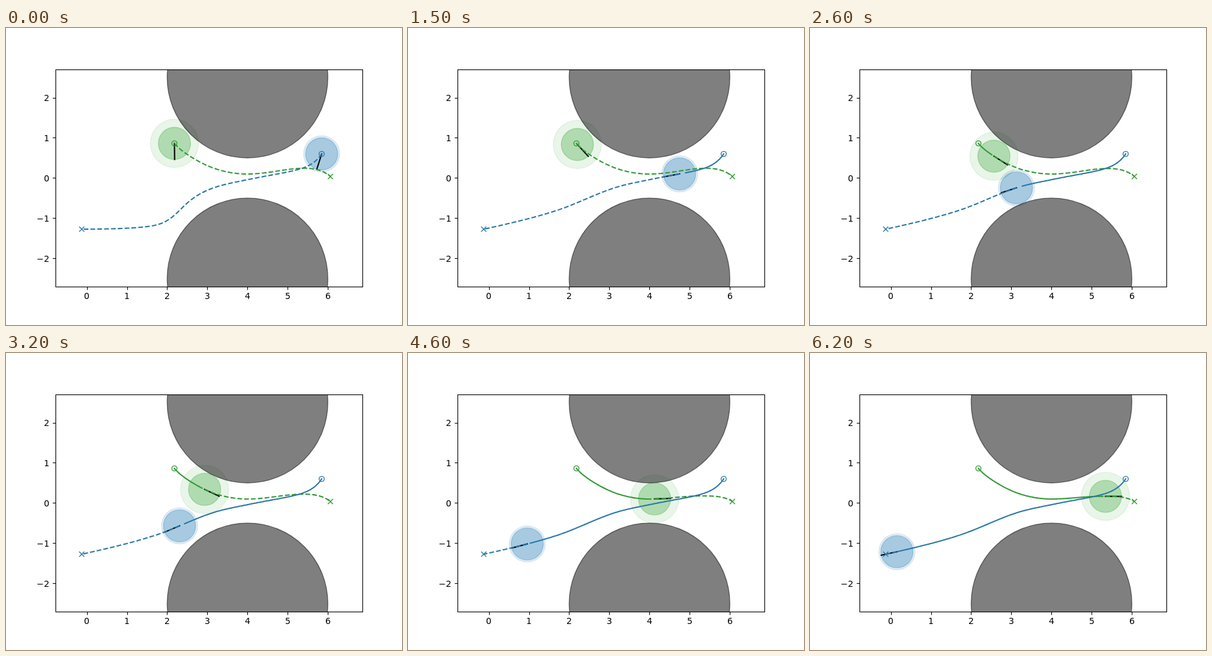
Write an HTML page that moves like this. It is 640 px wide and 480 px high and loops after 6.3 s.

```html
<!DOCTYPE html>
<html lang="en">
<head>
<meta charset="utf-8">
<title>Two robots passing a gap</title>
<style>
  html, body { margin: 0; width: 100%; height: 100%; overflow: hidden; background: #fff; }
  svg { display: block; width: 640px; height: 480px; }
  text { font: 13.89px "DejaVu Sans", sans-serif; fill: #000; }
</style>
</head>
<body>
<svg id="stage" viewBox="0 0 640 480">
  <defs><clipPath id="axes"><rect x="80" y="67" width="496" height="351"/></clipPath></defs>
</svg>
<script>
const STEP = 100, STEPS = 63;
const UNIT = 64.93, X0 = 130.6, Y0 = 242.4;
const TURN = 2.9; // degrees a robot can turn in towards its path per step
const stage = document.getElementById('stage');

function set(node, attrs) {
  for (const key in attrs) node.setAttribute(key, attrs[key]);
}

function add(parent, tag, attrs, text) {
  const node = document.createElementNS('http://www.w3.org/2000/svg', tag);
  set(node, attrs);
  if (text !== undefined) node.textContent = text;
  return parent.appendChild(node);
}

// Smooth curve through [x, y] points, level at peaks.
function curve(points) {
  const last = points.length - 1;
  const gap = i => points[i + 1][0] - points[i][0];
  const rise = i => (points[i + 1][1] - points[i][1]) / gap(i);
  const slope = points.map((p, i) => {
    if (i === 0 || i === last) return 0;
    const a = rise(i - 1), b = rise(i);
    return a * b <= 0 ? 0 : (a * gap(i) + b * gap(i - 1)) / (gap(i) + gap(i - 1));
  });
  slope[0] = (3 * rise(0) - slope[1]) / 2;
  slope[last] = (3 * rise(last - 1) - slope[last - 1]) / 2;
  return x => {
    let i = 0;
    while (i < last - 1 && x > points[i + 1][0]) i++;
    const h = gap(i), u = (x - points[i][0]) / h, v = 1 - u;
    return points[i][1] * v * v * (1 + 2 * u) + points[i + 1][1] * u * u * (3 - 2 * u)
      + h * u * v * (slope[i] * v - slope[i + 1] * u);
  };
}

function smooth(u) {
  u = Math.min(1, Math.max(0, u));
  return u * u * (3 - 2 * u);
}

function trace(f, from, to) {
  const n = Math.max(1, Math.ceil(Math.abs(to - from) / 1.5));
  let d = '';
  for (let i = 0; i <= n; i++) {
    const x = from + (to - from) * i / n;
    d += (i ? 'L' : 'M') + x.toFixed(2) + ' ' + f(x).toFixed(2);
  }
  return d;
}

const greenBase = curve([[272.2, 192], [340, 228], [390, 236], [462, 231.7], [524.3, 231]]);
const greenRun = curve([[9, 272.2], [20, 280], [32, 321], [54, 442.5], [62, 477.5]]);
const blueBase = curve([[122.4, 325.2], [240, 295], [345, 255], [390, 245.2], [510.2, 224.8]]);

// path: the route driven; detour: how far the first plan strays from it;
// settled: how much of the detour is gone; lag: heading error at the start.
const robots = [
  {
    fill: '#2ca02c', line: '#339a38', start: 272.2, goal: 524.3, outer: 0.6, haze: 0.1, lag: 40,
    path: x => greenBase(x) - 5.5 * Math.exp((272.2 - x) / 10) + 9 * Math.exp((x - 524.3) / 14),
    detour: x => x < 390 ? 0 : -5 * Math.sin(Math.PI * ((x - 390) / 134.3) ** 2),
    settled: n => smooth((n - 20) / 34),
    x: n => greenRun(Math.max(9, n))
  },
  {
    fill: '#1f77b4', line: '#2a77a8', start: 510.2, goal: 122.4, outer: 0.45, haze: 0.13, lag: -17,
    path: x => blueBase(x) - 21.3 * Math.exp((x - 510.2) / 16),
    detour: x => 0.215 * (x - 122.4) / (1 + Math.exp((x - 278) / 13)),
    settled: n => 1 - 0.5 ** n,
    x: curve([[0, 510.2], [9, 487.5], [20, 390.3], [32, 280.5], [46, 192.7], [62, 140.5]])
  }
];

const plot = add(stage, 'g', { 'clip-path': 'url(#axes)' });

function disc(color, alpha, radius, place) {
  return add(plot, 'circle', {
    r: radius * UNIT, fill: color, 'fill-opacity': alpha,
    stroke: color, 'stroke-opacity': alpha, 'stroke-width': 1.39, ...place
  });
}

function stroke(color, extra) {
  return add(plot, 'path', { fill: 'none', stroke: color, 'stroke-width': 2.08, 'stroke-linejoin': 'round', ...extra });
}

for (const r of robots) r.discs = [disc(r.fill, r.haze, r.outer), disc(r.fill, 0.3, 0.4)];
for (const y of [2.5, -2.5]) disc('#000', 0.5, 2, { cx: X0 + 4 * UNIT, cy: Y0 - y * UNIT });
for (const r of robots) r.nose = stroke('#000', { 'stroke-linecap': 'square' });
for (const r of robots) {
  r.trail = stroke(r.line, { 'stroke-linecap': 'square' });
  r.plan = stroke(r.line, { 'stroke-dasharray': '7.71 3.33' });
  const thin = { fill: 'none', stroke: r.line, 'stroke-width': 1.39 };
  add(plot, 'circle', { cx: r.start, cy: r.path(r.start), r: 4.17, ...thin });
  add(plot, 'path', { d: `M${r.goal - 4.17} ${r.path(r.goal) - 4.17}l8.34 8.34m0 -8.34l-8.34 8.34`, ...thin });
}

// Frame, ticks and labels
const ink = { fill: 'none', stroke: '#000', 'stroke-width': 1.11 };
const snap = v => Math.floor(v + 0.5) + 0.5;
add(stage, 'rect', { x: 80.5, y: 67.5, width: 496, height: 351, ...ink });
for (let v = 0; v <= 6; v++) {
  const x = X0 + v * UNIT;
  add(stage, 'path', { d: `M${snap(x)} 418.5v4.9`, ...ink });
  add(stage, 'text', { x: Math.round(x - 4.42), y: 438 }, v);
}
for (let v = -2; v <= 2; v++) {
  const y = Y0 - v * UNIT;
  add(stage, 'path', { d: `M80.5 ${snap(y)}h-4.9`, ...ink });
  add(stage, 'text', { x: 70, y: Math.round(y + 5.3), 'text-anchor': 'end' }, v < 0 ? '\u2212' + -v : v);
}

function heading(r, x, n) {
  const dx = Math.sign(r.goal - r.start);
  const tangent = Math.atan2(r.path(x + dx) - r.path(x), dx);
  const error = Math.sign(r.lag) * Math.max(0, Math.abs(r.lag) - TURN * n);
  return tangent + error * Math.PI / 180;
}

function draw(n) {
  for (const r of robots) {
    const x = r.x(n), y = r.path(x), a = heading(r, x, n), len = 0.4 * UNIT;
    const stray = 1 - r.settled(n);
    for (const d of r.discs) set(d, { cx: x, cy: y });
    set(r.nose, { d: `M${x} ${y}l${len * Math.cos(a)} ${len * Math.sin(a)}` });
    set(r.plan, { d: trace(px => r.path(px) + stray * r.detour(px), x, r.goal) });
    // The trail reaches only the previous position.
    const behind = r.x(Math.max(0, n - 1));
    set(r.trail, { d: Math.abs(behind - r.start) > 0.05 ? trace(r.path, r.start, behind) : '' });
  }
}

const begin = performance.now();
function tick() {
  draw(Math.floor(Math.max(0, performance.now() - begin) / STEP) % STEPS);
  requestAnimationFrame(tick);
}
tick();
</script>
</body>
</html>
```
